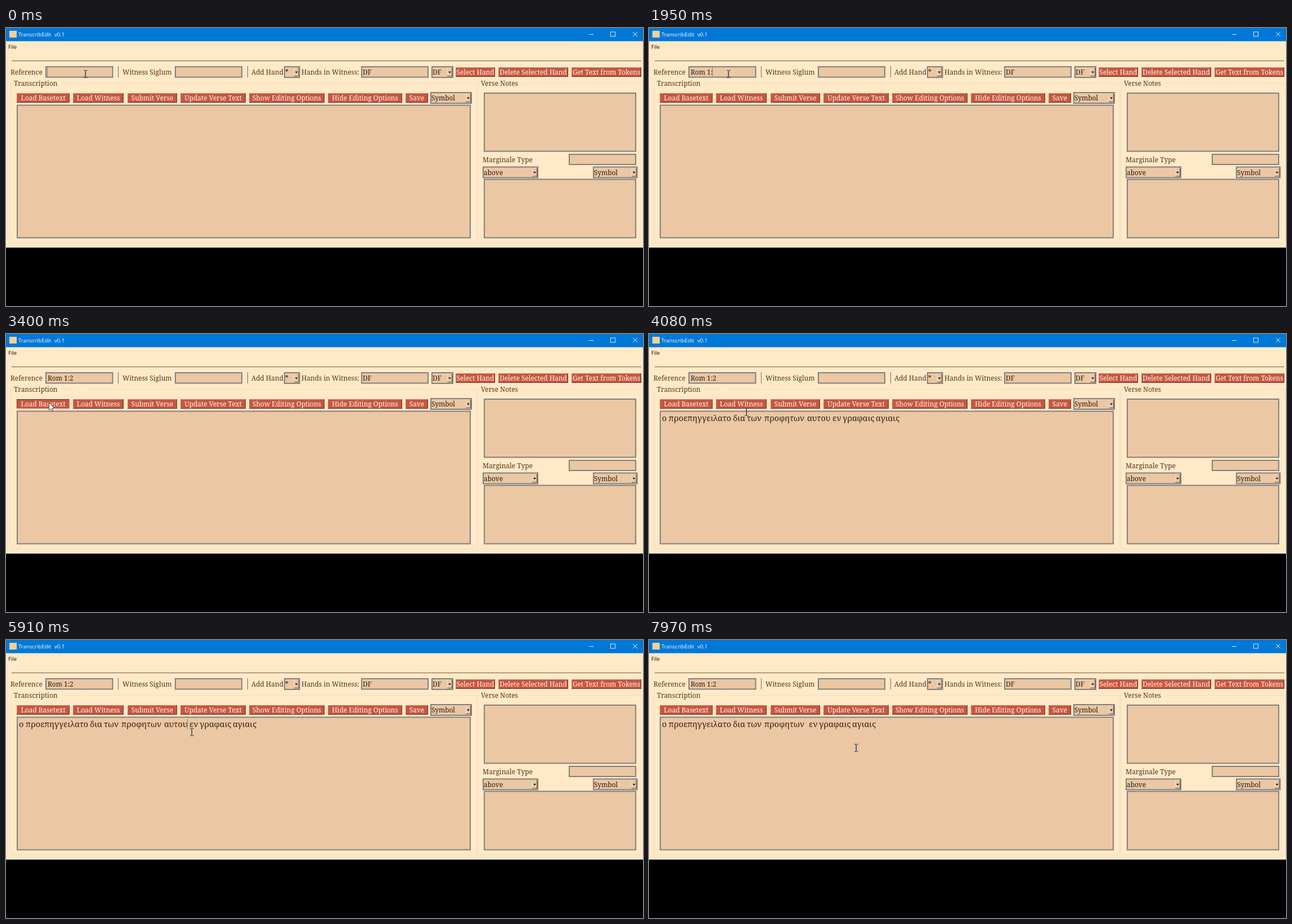
Recreate the animation shown at these times as an HTML page with a canvas. Size 1132 by 495 pixels, loop 8 s.

```html
<!DOCTYPE html>
<html lang="en">
<head>
<meta charset="utf-8">
<title>Transcription editor</title>
<style>
html, body { margin: 0; width: 100%; height: 100%; overflow: hidden; background: #000; }
canvas { display: block; }
</style>
</head>
<body>
<canvas id="stage" width="1132" height="495"></canvas>
<script>
const ctx = document.getElementById('stage').getContext('2d');
const LOOP = 8000;
const PAGE = '#ffe9c7', FIELD = '#ebc7a3', GREY = '#808080', INK = '#2e1d10', BROWN = '#54351a';
const CARET = '#80777a', CONTROL = '#d9eafa';
const SERIF = '11.9px "Noto Serif", serif';
const GREEK = '14.4px "Noto Serif", serif';
const SANS = '9.6px "Open Sans", sans-serif';

function box(x, y, w, h, color) {
  ctx.fillStyle = color;
  ctx.fillRect(x, y, w, h);
}

function text(str, x, y, color = BROWN, font = SERIF, align = 'left') {
  ctx.font = font;
  ctx.textAlign = align;
  ctx.fillStyle = color;
  ctx.fillText(str, x, y);
}

function path(points, close) {
  ctx.beginPath();
  points.forEach(([x, y]) => ctx.lineTo(x, y));
  if (close) ctx.closePath();
}

function field(x, y, r, b) {
  box(x, y, r - x, b - y, GREY);
  box(x + 2, y + 2, r - x - 4, b - y - 4, FIELD);
}

function combo(str, x, y, r) {
  field(x, y, r, y + 21);
  text(str, x + 2, y + 15, INK);
  box(r - 11, y + 3, 1, 15, '#f6dfc4');
  box(r - 11, y + 17, 9, 1, '#6b5541');
  box(r - 3, y + 3, 1, 15, '#6b5541');
  path([[r - 9, y + 9.5], [r - 4, y + 9.5], [r - 6.5, y + 12.5]], true);
  ctx.fillStyle = '#111';
  ctx.fill();
}

function button(str, x, r, y, pressed) {
  const dark = '#6f2c20', light = '#d67a66', w = r - x;
  box(x, y, w, 17, pressed ? light : dark);
  box(x, y, w - 1, 16, pressed ? dark : light);
  box(x + 1, y + 1, w - 2, 15, '#c75640');
  text(str, (x + r) / 2, y + 13, '#fff6ec', SERIF, 'center');
}

function group(str, x, r, labelWidth) {
  ctx.strokeStyle = '#ecdfcb';
  ctx.lineWidth = 1;
  ctx.strokeRect(x + .5, 98.5, r - x, 284);
  box(x + 4, 97, labelWidth, 3, PAGE);
  text(str, x + 6, 103);
}

function titleBar() {
  box(0, 0, 1132, 23.5, '#0078d7');
  box(6, 5, 13, 12, '#f5d096');
  text('TranscribEdit', 22, 15, '#fff', SANS);
  text('v0.1', 86, 15, '#fff', SANS);
  box(1036, 11, 8, 1, CONTROL);
  ctx.strokeStyle = CONTROL;
  ctx.lineWidth = 1;
  ctx.strokeRect(1074.5, 7, 8, 8);
  path([[1114, 7], [1122, 15]]);
  ctx.stroke();
  path([[1122, 7], [1114, 15]]);
  ctx.stroke();
}

function form(t) {
  box(0, 0, 1132, 495, '#000');
  box(0, 0, 1132, 391, PAGE);
  titleBar();
  text('File', 4, 36.5, '#111', SANS);
  box(10, 58, 1119, 1, '#7d5b3c');

  text('Reference', 8, 83);
  field(70, 68, 190.5, 88.5);
  box(199, 68, 1, 20, '#7d6a54');
  text('Witness Siglum', 207, 83);
  field(300, 68, 420, 88.5);
  box(429, 68, 1, 20, '#7d6a54');
  text('Add Hand', 436, 83);
  combo('*', 494, 68, 522.5);
  text('Hands in Witness:', 525, 83);
  field(631, 68, 751, 88.5);
  text('DF', 634, 83, INK);
  combo('DF', 756, 68, 795);
  button('Select Hand', 799, 869, 70);
  button('Delete Selected Hand', 875, 999, 70);
  button('Get Text from Tokens', 1005, 1129, 70);

  group('Transcription', 8, 836, 86);
  if (t >= 2740) box(130, 98, 9, 1, PAGE);
  button('Load Basetext', 19, 113, 116, t >= 3400 && t < 3500);
  button('Load Witness', 119, 209, 116);
  button('Submit Verse', 216, 304, 116);
  button('Update Verse Text', 310, 426, 116);
  button('Show Editing Options', 432, 566, 116);
  button('Hide Editing Options', 572, 704, 116);
  button('Save', 710, 750, 116);
  combo('Symbol', 754, 114, 828);
  field(19, 136.5, 826, 374.5);

  group('Verse Notes', 838, 1131, 76);
  field(849, 115, 1120, 220.5);
  text('Marginale Type', 847, 239);
  field(1000, 224, 1120, 244);
  combo('above', 847, 246.5, 946);
  combo('Symbol', 1043, 246.5, 1122.5);
  field(849, 268.5, 1120, 374.5);
}

// Latest entry whose start time has passed
const at = (steps, t) => steps.findLast(step => step[0] <= t);

const typed = [
  [0, ''], [750, 'R'], [860, 'Ro'], [970, 'Rom'], [1190, 'Rom '],
  [1510, 'Rom 1'], [1950, 'Rom 1:'], [2180, 'Rom 1:2']
];

function reference(t) {
  const str = at(typed, t)[1];
  text(str, 74, 83, INK);
  if (t < 510 || (t >= 750 && t < 2740)) {
    box(Math.round(73 + ctx.measureText(str).width), 70, 1, 16, CARET);
  }
}

// Start time, remaining letters, caret x, leftward shift of the following words
const erased = [
  [0, 'αυτου', 322, 0], [7090, 'αυτ', 305, 17], [7230, 'αυ', 298, 24],
  [7340, 'α', 290, 33], [7450, '', 281, 42]
];
const head = [['ο', 23], ['προεπηγγειλατο', 35], ['δια', 149], ['των', 174], ['προφητων', 205]];
const tail = [['εν', 326], ['γραφαις', 344], ['αγιαις', 403]];

function verse(t) {
  if (t < 3500) return;
  const [, rest, caret, shift] = at(erased, t);
  const word = (str, x) => text(str, x, 155, INK, GREEK);
  head.forEach(([str, x]) => word(str, x));
  word(rest, 281);
  tail.forEach(([str, x]) => word(str, x - shift));
  if ((t >= 5780 && t < 6320) || (t >= 6890 && t < 7970)) box(caret, 141, 1, 18, CARET);
}

const pointer = [
  [0, 141, 82, beam], [2600, 144, 85, beam], [2740, 130, 91, arrow], [2820, 105, 99, arrow],
  [2960, 99, 105, arrow], [3060, 89, 113, arrow], [3160, 80, 120, arrow], [3260, 76, 122, arrow],
  [3600, 80, 121, arrow], [3710, 94, 117, arrow], [3810, 118, 114, arrow], [3910, 145, 139, beam],
  [4080, 173, 139, beam], [4170, 205, 144, beam], [4250, 234, 149, beam], [4340, 251, 151, beam],
  [4480, 280, 154, beam], [4590, 308, 157, beam], [4690, 323, 157, beam],
  [4910, 322, 155, beam], [5020, 320, 154, beam], [5120, 319, 153, beam],
  [5470, 321, 154, beam], [5560, 319, 154, beam],
  [5780, 320, 156, beam], [5910, 330, 164, beam], [6010, 368, 192, beam]
];

function beam(x, y) {
  const color = '#2c3e50';
  for (const dy of [-7, 6]) {
    box(x - 3, y + dy, 3, 1, color);
    box(x + 1, y + dy, 3, 1, color);
  }
  box(x - .5, y - 6, 1.5, 12, color);
}

function arrow(x, y) {
  path([[0, 0], [0, 13], [3, 10.3], [5.2, 15.3], [7.3, 14.4], [5.2, 9.6], [9.3, 9.3]]
    .map(([dx, dy]) => [x + dx + .5, y + dy + .5]), true);
  ctx.fillStyle = '#fff';
  ctx.fill();
  ctx.strokeStyle = '#3a3a3a';
  ctx.lineWidth = .9;
  ctx.stroke();
}

const start = performance.now();

function draw() {
  const t = (performance.now() - start) % LOOP;
  form(t);
  reference(t);
  verse(t);
  const [, x, y, shape] = at(pointer, t);
  shape(x, y);
  requestAnimationFrame(draw);
}
draw();
</script>
</body>
</html>
```
